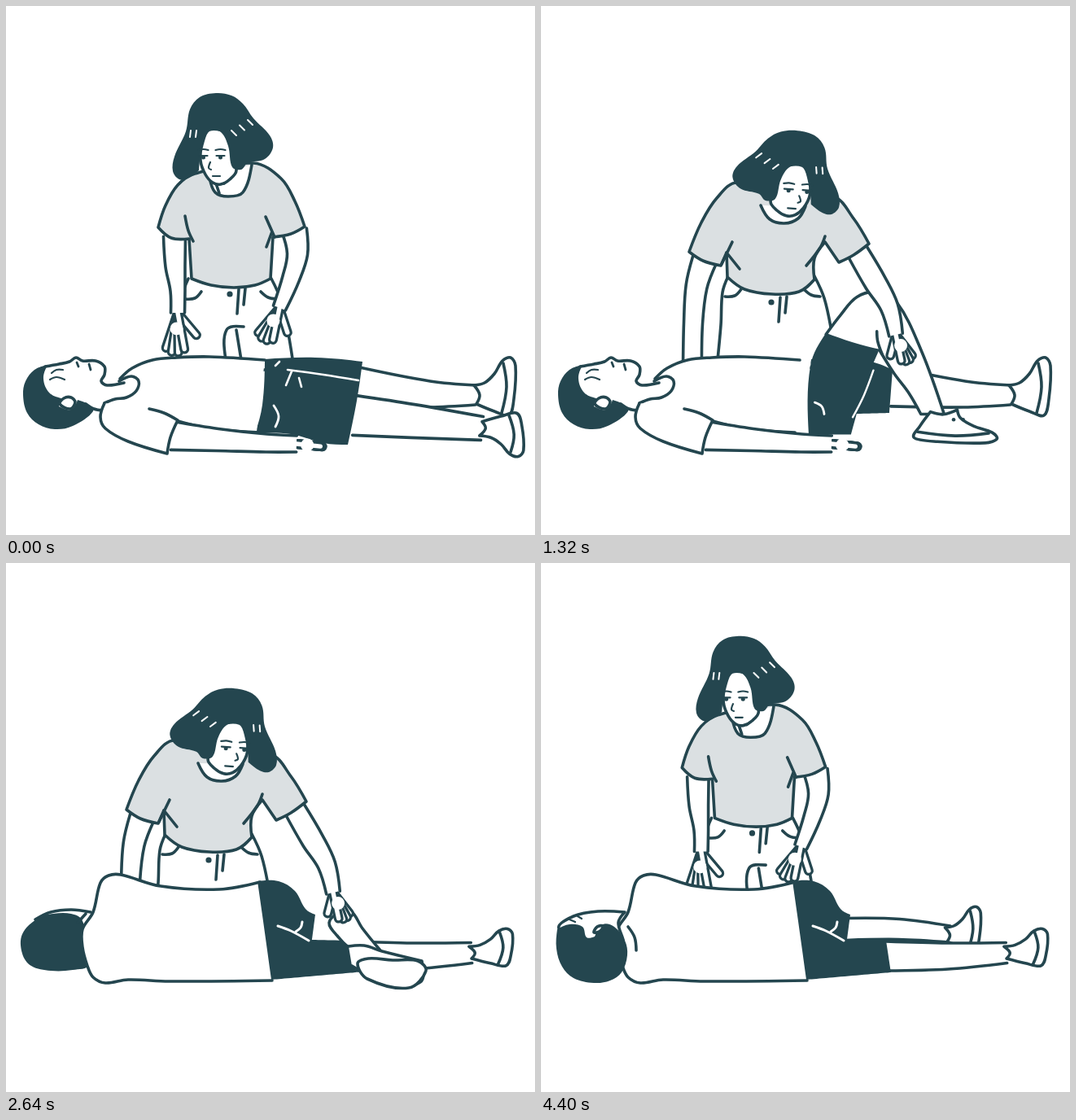
Recreate the animation shown at these times as an HTML page with a canvas. Size 650x650 px, loop 6160 ms.

```html
<!DOCTYPE html>
<html lang="en">
<head>
<meta charset="utf-8">
<title>Recovery position</title>
<style>
html, body { margin: 0; width: 100%; height: 100%; overflow: hidden; background: #fff; }
canvas { display: block; width: 650px; height: 650px; }
</style>
</head>
<body>
<canvas id="stage" width="650" height="650"></canvas>
<script>
const ctx = document.getElementById('stage').getContext('2d');
const INK = '#24464f', GREY = '#dbe0e2', WHITE = '#fff', PEN = 3.6;
const cache = new Map();
let M = new DOMMatrix();
ctx.lineCap = ctx.lineJoin = 'round';

// Smooth curve through "x,y" points; "!" marks a corner, "z" closes, ";" starts a new line.
function trace(str) {
  if (cache.has(str)) return cache.get(str);
  const p = new Path2D();
  for (const part of str.split(';')) {
    const closed = part.endsWith('z');
    const pts = part.replace('z', '').trim().split(' ').map(w => {
      const [x, y] = w.split(',').map(parseFloat);
      return { x, y, corner: w.endsWith('!') };
    });
    const n = pts.length;
    const get = i => closed ? pts[(i + n) % n] : pts[i];
    const handle = (i, side) => {
      const a = get(i - 1), b = get(i), c = get(i + 1);
      if (b.corner || !a || !c) return null;
      const before = Math.hypot(b.x - a.x, b.y - a.y);
      const after = Math.hypot(c.x - b.x, c.y - b.y);
      const k = 0.36 * (side > 0 ? after : -before) / (before + after);
      return { x: b.x + (c.x - a.x) * k, y: b.y + (c.y - a.y) * k };
    };
    const mid = (a, b) => ({ x: (a.x + b.x) / 2, y: (a.y + b.y) / 2 });
    p.moveTo(pts[0].x, pts[0].y);
    for (let i = 0; i < (closed ? n : n - 1); i++) {
      const s = get(i), e = get(i + 1);
      const out = handle(i, 1), into = handle(closed ? (i + 1) % n : i + 1, -1);
      const c1 = out ?? mid(s, into ?? s), c2 = into ?? mid(e, out ?? e);
      p.bezierCurveTo(c1.x, c1.y, c2.x, c2.y, e.x, e.y);
    }
    if (closed) p.closePath();
  }
  cache.set(str, p);
  return p;
}

function placed(str) {
  const p = new Path2D();
  p.addPath(trace(str), M);
  return p;
}
function line(str, width = PEN, color = INK) {
  ctx.lineWidth = width;
  ctx.strokeStyle = color;
  ctx.stroke(placed(str));
}
function fill(color, str) {
  ctx.fillStyle = color;
  ctx.fill(placed(str));
}
function shape(color, str) {
  fill(color, str);
  line(str);
}
const fine = str => line(str, 2.2);
const light = (str, w = 2) => line(str, w, WHITE);
function dot(x, y, r, color = INK) {
  const p = M.transformPoint(new DOMPoint(x, y));
  ctx.fillStyle = color;
  ctx.beginPath();
  ctx.arc(p.x, p.y, r, 0, 7);
  ctx.fill();
}
// Draws with the pivot (px,py) moved to (x,y), then turned and scaled around it.
function at(px, py, x, y, turn, sx, sy, draw) {
  const keep = M;
  M = M.translate(x, y).rotate(turn).scale(sx, sy).translate(-px, -py);
  draw();
  M = keep;
}

/* ---- shared parts ---- */
// A tube along "x,y,width" points with open ends.
function limb(str) {
  const pts = str.split(' ').map(w => w.split(',').map(Number));
  const side = sign => pts.map(([x, y, w], i) => {
    const a = pts[Math.max(i - 1, 0)], b = pts[Math.min(i + 1, pts.length - 1)];
    const dx = b[0] - a[0], dy = b[1] - a[1], k = sign * w / 2 / Math.hypot(dx, dy);
    return `${(x - dy * k).toFixed(1)},${(y + dx * k).toFixed(1)}`;
  });
  const l = side(1), r = side(-1).reverse();
  fill(WHITE, `${l.join(' ')}! ${r[0]}! ${r.slice(1).join(' ')}`);
  line(`${l.join(' ')};${r.join(' ')}`);
}

// Four fingers and a thumb fanned out from the wrist.
function hand(x, y, angle, size = 50, spread = 1, thumb = -1) {
  const finger = (deg, len) => {
    const a = (angle + deg * spread) * Math.PI / 180;
    const path = `${x},${y} ${(x + Math.cos(a) * len).toFixed(1)},${(y + Math.sin(a) * len).toFixed(1)}`;
    line(path, 12);
    line(path, 5.4, WHITE);
  };
  if (thumb) finger(thumb * 44, size * .66);
  for (let i = 0; i < 4; i++) finger(thumb * (9.6 * i - 14.4), size * (1 - .03 * (i - 1.5) ** 2) - 5);
  const a = angle * Math.PI / 180;
  dot(x + Math.cos(a) * size * .36, y + Math.sin(a) * size * .36, 8, WHITE);
}

function arm(str, ...grip) {
  if (grip.length) {
    const [x, y] = str.split(' ').pop().split(',').map(Number);
    hand(x, y, ...grip);
  }
  limb(str);
}

// The sole faces right and the toes point up unless turned or flipped.
function shoe(x, y, sx, sy, turn = 0) {
  at(0, 0, x, y, turn, sx, sy, () => {
    shape(WHITE, '-3,-12! 10,-15 22,-26 32,-42 42,-46 48,-36 46,5 40,25 22,20 0,11! 4,0z');
    line('33,-39 37,-10 31,22');
  });
}

function fly(x, y) {
  dot(x, y, 3.6);
  line(`${x + 11},${y - 6} ${x + 9},${y + 24};${x + 19},${y - 7} ${x + 17},${y + 13}`);
}
function pants(l, r, y, drop) {
  shape(WHITE, `${l},${y} ${l - 7},${y + 20} ${l - 9},${y + 60} ${l - 14},${y + 112}! ${r + 28},${y + 112}! ${r + 21},${y + 68} ${r + 12},${y + 27} ${r},${y}`);
  line(`${l - 4},${y + 25} ${l + 8},${y + 24} ${l + 16},${y + 16};${r - 13},${y + 16} ${r - 4},${y + 23} ${r + 7},${y + 25}`);
  fly((l + r) / 2, y + drop);
}

function eyes(x, y, gap) {
  for (const ex of [x - gap / 2, x + gap / 2]) {
    fine(`${ex - 5},${y - 2} ${ex + 5},${y - 2};${ex - 6},${y - 9} ${ex},${y - 10} ${ex + 6},${y - 9}`);
    dot(ex, y, 2.5);
  }
}
function headSide() {
  shape(WHITE, '250,152 241,170 239,190 245,207 254,217 264,219 275,213 283,202 276,160z');
  fill(INK, '258,107 238,112 226,127 221,154 207,185 205,203 213,213 223,212 237,202! 239,182 243,165 249,151! 264,155 273,172 278,198 289,201 297,193 318,188 328,174 324,159 304,138 291,120 277,110z');
  for (let i = 0; i < 3; i++) light(`${277 + 10 * i},${153 - 6.5 * i} ${283 + 10 * i},${159 - 6.5 * i}`);
  for (const x of [227, 234]) light(`${x},153 ${x - 1},161`);
  eyes(253, 186, 21);
  fine('251,192 249,199 252,201;254,209 263,209');
}
function headFront() {
  shape(WHITE, '366,254 336,278 343,297 359,306 375,301 386,284z');
  const half = [[0, -55], [20, -50], [35, -28], [55, 0], [56, 20], [46, 38], [29, 38]];
  const right = half.map(([x, y]) => `${365 + x},${251 + y}`);
  const left = half.slice(1).map(([x, y]) => `${365 - x},${251 + y}`).reverse();
  fill(INK, `${right.join(' ')}! 381,267 367,251! 357,269 334,277 ${left.join(' ')}z`);
  for (let i = 0; i < 3; i++) {
    for (const s of [-1, 1]) light(`${365 + s * (17 + 9 * i)},${250 - 6 * i} ${365 + s * (14 + 9 * i)},${255 - 6 * i}`);
  }
  eyes(363, 283, 22);
  fine('363,286 365,293 361,296;355,301 363,300');
}

/* ---- helper's poses: back goes behind the lying man, front before him ---- */
const stand = {
  back() {
    pants(224, 326, 335, 19);
    line('270,435 271,398 292,394;283,398 289,435');
    arm('207,283,27 208,320,24 211,350,18 211,377,17', 94, 54);
    arm('354,275,31 358,305,25 350,335,21 336,371,16', 116, 48);
    shape(GREY, '232,206 211,220 196,245 187,272! 203,285 225,286! 228,335! 252,343 280,346 306,343 325,335! 328,284! 350,280 367,271! 355,240 338,212 304,193z');
    line('220,258 224,276 230,289;319,259 330,284;327,277 320,296');
    shape(WHITE, '250,210 257,229 273,234 291,229 302,195');
    line('258,218 262,230;268,218 281,206');
    headSide();
  },
  front() {}
};

const wideArms = [['168,306,36 143,353,28 133,400,24'], ['342,306,31 357,342,28 368,380,20 377,406,22', 88, 30, .5, 0]];
const lowArms = [['168,306,36 161,345,27 167,385,20 169,418,17', 92, 42], ['342,306,31 352,342,27 349,380,22 340,410,18', 108, 40]];
const touchArms = [['168,306,36 153,350,28 143,400,23 139,438,18', 85, 42], ['342,306,31 354,342,27 351,380,22 342,410,18', 100, 40]];

const kneel = ([left, right], leftInFront) => ({
  back() {
    pants(197, 306, 323, 38);
    if (!leftInFront) arm(...left);
  },
  front() {
    if (leftInFront) arm(...left);
    arm(...right);
    shape(GREY, '216,223 192,231 170,257 151,291! 165,308 184,318! 201,296! 199,324! 216,341 250,351 285,346 306,322! 313,294! 320,314! 340,308 358,299! 342,258 314,224z');
    line('201,296 192,310;318,283 306,310 304,325');
    shape(WHITE, '227,234 236,258 256,268 279,260 287,230');
    at(250, 151, 241, 180, 8, 1.02, 1, headSide);
  }
});

const look = {
  back() {
    pants(196, 302, 332, 32);
    arm('167,312,30 157,345,26 153,390,23 152,445,23');
  },
  front() {
    arm('355,302,26 377,340,27 394,370,22 402,404,17', 65, 40, .9, 1);
    shape(GREY, '207,217 182,236 163,266 148,302! 165,313 187,319! 194,303! 195,333! 216,348 250,354 283,351 302,336! 302,310 315,290! 332,315! 350,306 369,292! 350,261 325,234z');
    line('201,290 188,317;194,303 210,323;315,283 309,297 292,319');
    shape(WHITE, '236,245 247,262 265,267 282,261 291,246');
    at(250, 151, 287, 195, 4, -1.08, .94, headSide);
  }
};

const low = {
  back() {
    line('244,352 236,375 217,405 207,434;270,433 285,410 299,395 308,396 301,434;367,350 370,390 368,434');
    line('246,358 263,359;348,361 366,366;302,368 306,371;310,370 309,381;318,368 308,388');
    arm('228,347,28 211,377,23 200,404,20 192,437,30');
    line('184,435 191,429');
  },
  front() {
    arm('400,376,36 422,407,32 441,436,29 454,467,23', 25, 52, .45, 0);
    shape(GREY, '268,258 243,272 226,304 211,338! 225,346 245,352! 256,337! 280,357 312,366 342,361 366,347! 381,380! 400,378 419,370! 405,326 370,280z');
    line('259,329 250,345;359,345 367,352');
    shape(WHITE, '299,298 310,311 328,317 344,313 354,302');
    at(250, 151, 347, 258, 5, -.97, .86, headSide);
  }
};

const crouch = {
  back() {
    line('279,300 266,304 256,322 240,365 222,396 216,432;259,336 266,340 275,340');
    line('182,433 191,422 205,419 216,428;187,432 201,429 215,431');
    line('338,366 329,386;342,383 330,385;273,432 281,414 294,402;290,430 297,414');
  },
  front() {
    shape(WHITE, '434,303 450,319 459,330 454,342 436,347! 414,330! 418,315 430,308');
    hand(411, 326, 96, 44, 1.5, 0);
    line('385,349 392,333 411,324 430,327 437,340');
    arm('306,376,33 312,430,28 319,490,24', 90, 46, .55);
    shape(GREY, '309,260 292,270 283,287 281,375! 302,379 328,371! 350,367 375,352 391,333 410,309! 430,304 449,297! 438,279 420,261z');
    line('326,320 328,372;412,297 395,313 385,330;369,346 376,354');
    headFront();
  }
};

const hold = lift => ({
  back() {
    shape(WHITE, '170,355 158,410! 306,410! 298,358 290,325 275,300');
    line('254,337 264,344 277,343;206,385 222,388 241,400');
    fly(205, 364);
  },
  front() {
    at(0, 340, 0, 340, 0, 1, lift, () => {
      arm('108,339,33 97,372,27 83,399,25 65,430,24');
      arm('166,349,33 142,379,28 113,402,26 88,430,22', 143, 50, 1.1, 0);
    });
    shape(GREY, '90,266 87,300 86,335! 105,341 127,339! 130,325! 147,330! 145,343! 161,353 180,358! 215,358 245,343 276,297! 225,253 185,231 143,223z');
    line('111,302 122,319 144,331;169,270 157,298 145,343;211,300 194,330 180,358');
    shape(WHITE, '103,262 111,278 125,283 139,273 142,224');
    line('106,261 133,271');
    at(250, 151, 63, 207, -8, .95, .95, headSide);
  }
});

/* ---- lying man ---- */
function farLeg() {
  limb('432,468,48 520,477,32 577,478,24');
  shoe(578, 478, 1, 1);
}
function bentLeg() {
  shape(WHITE, '349,398! 366,373 385,350 408,344 431,357 460,420 486,500! 459,500! 445,473 428,448 411,418!');
  line('408,394 409,407 414,423');
  fill(INK, '349,396! 380,408 411,417! 397,455 378,526! 329,526! 331,438z');
  light('404,444 393,476 380,504', 2.4);
  light('336,485 344,490 347,500', 2.8);
  shoe(485, 497, .83, 1.35, 90);
  for (const x of [497, 508]) dot(x, 507, 2.3);
}
function faceUp() {
  const profile = '48,443 65,440 78,437 86,432 94,436 110,436 121,443 121,453 117,461 124,466 145,463';
  fill(WHITE, profile + '! 150,475 118,497! 90,495 52,480');
  line(profile);
  fill(INK, '51,441! 35,447 24,461 21,478 26,500 40,514 60,520 82,516 107,498 100,489 88,484! 80,496 65,492! 68,482! 53,475 46,458z');
  shape(WHITE, '66,489 71,482 80,481 85,487 79,495z');
  fine('56,451 62,447 70,447;54,459 62,456 72,459');
  line('87,438 89,443;102,440 104,447', 2.8);
}
function chest(folded) {
  fill(WHITE, '140,458! 155,445 180,435 210,431 250,431 318,435! 308,525! 210,511 160,500 122,488!');
  line('140,458 155,445 180,435 210,432 250,431 318,435;211,510 250,519 312,524');
  faceUp();
  line('139,461 154,455 163,461 160,473 148,481 134,483 121,488;98,489 108,495 119,497');
  if (folded) arm('205,528,34 245,510,28 248,480,24 222,458,18', 215, 36);
  else arm('204,528,35 260,533,27 320,537,22 357,538,20', 6, 37, 1.2, 0);
  shape(WHITE, '121,488 116,505 122,519 150,535 198,550! 202,530 211,509! 194,500 176,495');
}
function flat() {
  farLeg();
  limb('428,503,49 500,510,41 585,519,29');
  shoe(585, 519, 1.06, -.75);
  fill(INK, '318,434! 380,432 438,437! 431,485 420,539! 390,537 350,526 306,525! 315,490z');
  light('346,447 390,453 433,460;351,449 344,466;360,457 363,468;331,442 336,437', 2.6);
  light('329,491 335,504 331,517', 2.8);
  chest();
}
const kneeUp = (sx, sy, folded) => () => {
  farLeg();
  fill(INK, '330,434! 400,436 432,447! 428,500! 350,502!');
  fill(WHITE, '298,434! 349,397! 331,440 329,525! 305,525!');
  at(330, 537, 330, 537, 0, sx, sy, bentLeg);
  chest(folded);
};

function foldedLeg() {
  shape(WHITE, '410,429 424,428 438,449 460,476! 425,474 407,458 397,442z');
  shape(WHITE, '421,471 440,470 462,477 511,489! 509,515 470,516 425,495');
  shape(WHITE, '432,492 445,486 475,488 506,489 516,501 495,522 444,511z');
}
function rolling() {
  limb('440,470,44 520,479,28 574,481,24');
  shoe(573, 481, 1.06, .6);
  shape(WHITE, '48,453 75,449 106,446! 106,490! 60,490!');
  fill(INK, '51,455! 35,459 25,478 24,500 33,517 55,523 85,523 101,515 105,500 103,480! 88,478 82,488 71,489 68,482 72,477! 55,476 47,468z');
  fine('54,458 56,464 61,465;63,457 69,460');
  const back = '104,492 102,465 114,437 139,412 151,391 167,379 183,381 194,393 200,410';
  fill(WHITE, back + '! 250,404 312,401! 328,511! 150,513 102,513!');
  line(back + ';182,413 210,411 250,404 285,399 312,401;98,513 130,515 155,510 172,504;152,512 250,514 328,510');
  fill(INK, '310,401! 342,397 375,403 400,415 412,438 430,504! 390,507 326,512! 318,460z');
  light('352,468 370,465 381,457 384,446;373,461 395,455', 3);
  foldedLeg();
}

function upperLeg() {
  limb('375,450,27 440,450,25 502,456,20');
  shoe(499, 457, .86, .75);
}
function headAway() {
  line('36,438 55,429 80,426 104,429');
  fill(INK, '40,436 58,431 80,431 93,438 98,460 102,494 82,500 55,501 31,495 20,480 20,456z');
  line('98,431 88,442');
}
function headTilted() {
  shape(WHITE, '22,449 40,434 70,428 103,429! 95,442 100,470 60,480z');
  fill(INK, '20,450! 35,444 51,447 56,460 66,459! 76,444 90,447 103,464 106,482 99,503 85,513 65,516 40,510 26,496 19,474z');
  shape(WHITE, '65,454 69,447 76,446 73,452z');
  fine('35,438 42,441;45,434 50,437');
}
const onSide = (head, leg) => () => {
  if (head === 'away') headAway();
  if (leg === 'straight') upperLeg();
  limb('424,483,36 500,483,32 572,479,25');
  shoe(572, 479, 1.05, .64);
  shape(WHITE, '327,513! 200,514 150,512 122,516 107,509 100,495 94,472 94,450 107,429 116,393 126,384 141,383 190,397 262,401 312,392!');
  if (leg === 'half') at(378, 450, 380, 452, 9, .92, 1, upperLeg);
  fill(INK, '309,391! 335,391 355,403 368,425 380,432! 376,463! 424,464! 430,503! 326,512! 316,440z');
  light('334,446 350,452 372,464;356,453 362,448 364,441', 3);
  if (leg === 'folded') foldedLeg();
  if (head === 'tilted') {
    headTilted();
    line('107,447 115,460 117,476');
  }
  if (head === 'turning') at(60, 470, 60, 473, 4, 1, 1, headTilted);
};

// start ms, helper, shift x, shift y, man, helper scale
const poses = [
  [0, stand, 0, 0, flat],
  [220, kneel(lowArms), 11, -14, flat],
  [440, kneel(touchArms, true), 11, -14, flat],
  [660, look, 26, 6, flat],
  [880, low, 0, 0, flat],
  [1100, look, 34, 0, kneeUp(1.17, .8)],
  [1320, look, 34, 0, kneeUp(1.06, .96)],
  [1980, crouch, 0, 0, kneeUp(1, 1)],
  [2200, look, -25, -8, kneeUp(1, 1, true)],
  [2420, look, 0, 0, rolling],
  [2640, look, 0, 1, onSide('away', 'folded')],
  [3080, look, 0, 1, onSide('away', 'half')],
  [3300, kneel(wideArms), 0, 0, onSide('away', 'straight')],
  [3740, hold(1), 0, 0, onSide('away', 'straight')],
  [3960, hold(.96), -1, 1, onSide('turning', 'straight')],
  [4180, hold(.7), -4, 1, onSide('tilted', 'straight')],
  [4400, stand, -10, -15, onSide('tilted', 'straight'), .98]
];
const LOOP = 6160;

function render(now) {
  const [, helper, dx, dy, man, scale = 1] = poses.findLast(p => p[0] <= now % LOOP);
  ctx.fillStyle = WHITE;
  ctx.fillRect(0, 0, 650, 650);
  at(0, 0, dx, dy, 0, scale, scale, helper.back);
  man();
  at(0, 0, dx, dy, 0, scale, scale, helper.front);
}

let start;
function tick(now) {
  start ??= now;
  render(now - start);
  requestAnimationFrame(tick);
}
render(0);
requestAnimationFrame(tick);
</script>
</body>
</html>
```
